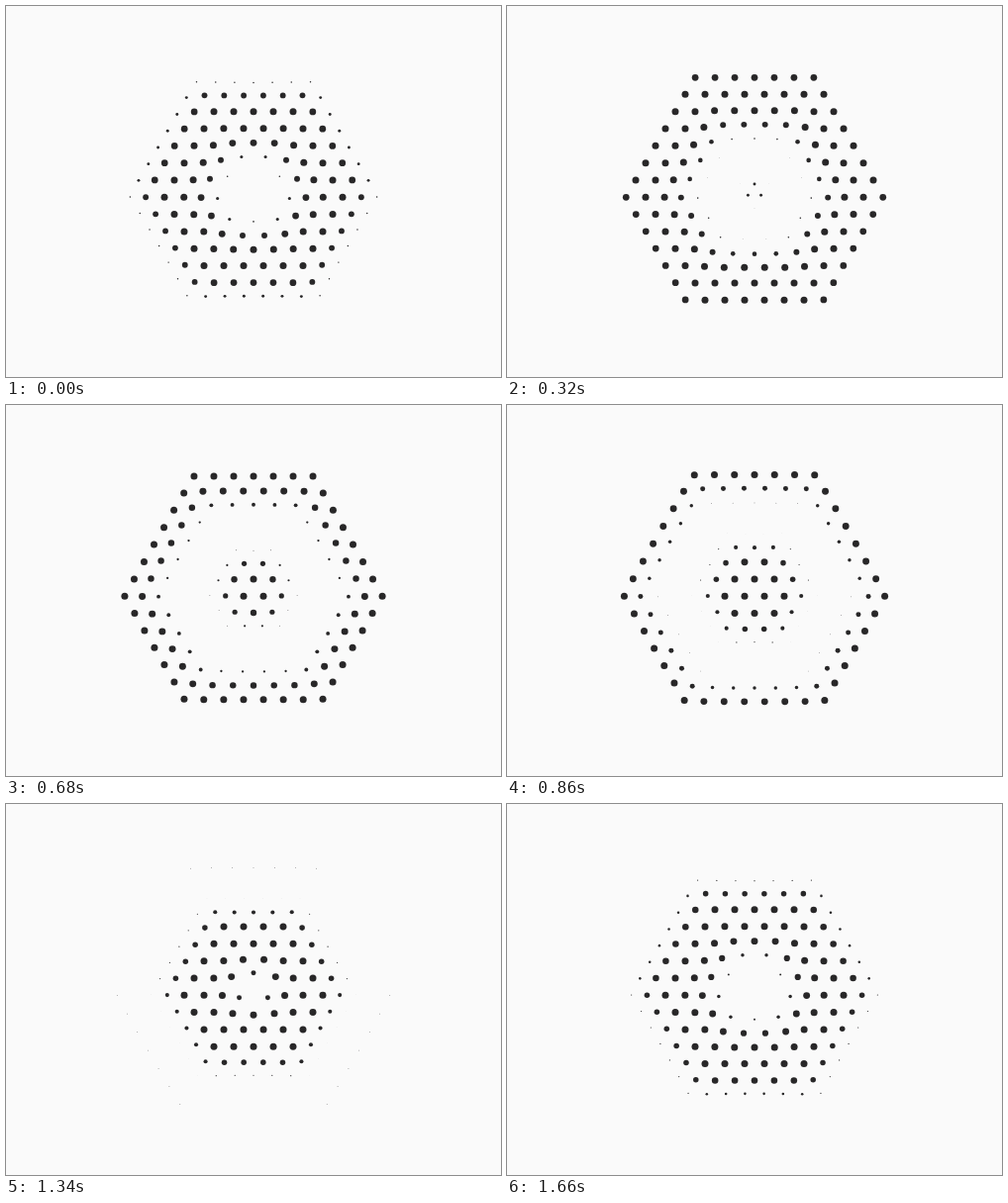
An HTML page with a canvas for the animation above (1680 ms loop, 500 px wide and 375 px high).

```html
<!DOCTYPE html>
<html lang="en">
<head>
<meta charset="utf-8">
<title>Hexagonal dot ripple</title>
<style>
  html, body { margin: 0; width: 100%; height: 100%; overflow: hidden; background: #fafafa; }
  canvas { display: block; width: 500px; height: 375px; }
</style>
</head>
<body>
<canvas id="stage"></canvas>
<script>
const W = 500, H = 375, LOOP = 1680, TICK = 20;
const GAP = 20, ROW = GAP * Math.sqrt(3) / 2, UNIT = ROW / 3;
const LAG = LOOP / 21;            // delay per hexagonal ring step
const RADIUS = 3.5, PULL = 6.8, PUSH = 8;

const canvas = document.getElementById('stage');
const ctx = canvas.getContext('2d');
const dpr = window.devicePixelRatio || 1;
canvas.width = W * dpr;
canvas.height = H * dpr;

// Cosine ease from 0 to 1 between two times.
function ease(t, from, to) {
  const x = Math.min(1, Math.max(0, (t - from) / (to - from)));
  return (1 - Math.cos(Math.PI * x)) / 2;
}

// Hexagonal distance from the centre, in steps of UNIT.
function ringOf(x, y) {
  const a = x * Math.sqrt(3) / 2, b = y / 2;
  return Math.round(Math.max(Math.abs(y), Math.abs(a + b), Math.abs(a - b)) / UNIT);
}

const dots = [];
for (let row = 0; row < 14; row++) {
  const count = row <= 7 ? 7 + row : 21 - row;
  const y = ROW * row - 20 * UNIT;
  for (let i = 0; i < count; i++) {
    const x = (i - (count - 1) / 2) * GAP;
    dots.push({ x, y, dist: Math.hypot(x, y), ring: ringOf(x, y) });
  }
}

function draw(time) {
  ctx.setTransform(dpr, 0, 0, dpr, 0, 0);
  ctx.fillStyle = '#fafafa';
  ctx.fillRect(0, 0, W, H);
  ctx.translate(W / 2, H / 2);
  ctx.fillStyle = '#282728';
  for (const d of dots) {
    let age = (time - d.ring * LAG + 2 * LOOP) % LOOP;
    if (age > LOOP - 90) age -= LOOP;
    const grow = ease(age, -90, 470);
    const r = RADIUS * grow * (1 - ease(age, 978, 1538));
    if (r < 0.1) continue;
    const shift = PUSH * ease(age, 703, 1513) - PULL * (1 - grow);
    const k = 1 + shift / d.dist;
    ctx.beginPath();
    ctx.arc(d.x * k, d.y * k, r, 0, Math.PI * 2);
    ctx.fill();
  }
}

const start = performance.now();
function frame() {
  const t = (performance.now() - start) % LOOP;
  draw(Math.floor(t / TICK) * TICK);
  requestAnimationFrame(frame);
}
frame();
</script>
</body>
</html>
```
